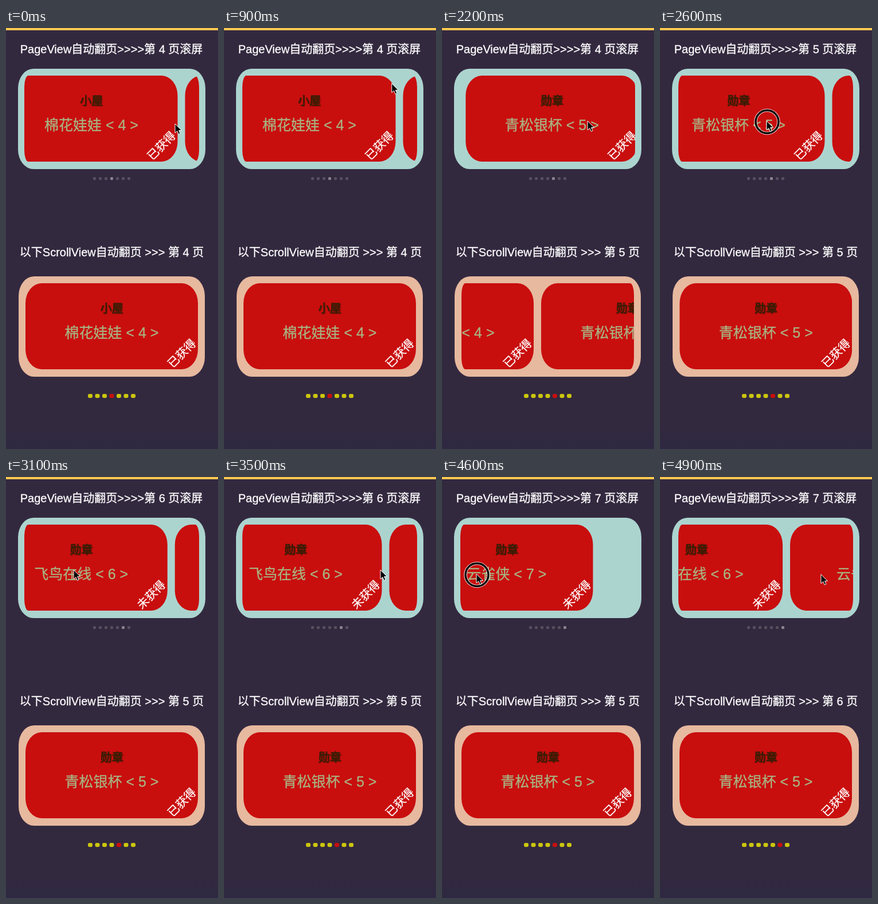
Write an HTML page that moves like this. It is 370x734 px and loops after 5000 ms.

```html
<!DOCTYPE html>
<html lang="zh-CN">
<head>
<meta charset="utf-8">
<style>
  html, body { margin: 0; width: 100%; height: 100%; overflow: hidden; background: #33293f; }
  svg { display: block; width: 100%; height: 100%; }
  text {
    font: 20px "Liberation Sans", "Noto Sans CJK SC", "Noto Sans CJK", sans-serif;
    fill: #fff; stroke: #fff; stroke-width: .3; text-anchor: middle;
  }
  .kind { fill: #2a2206; stroke: #2a2206; text-shadow: 1px 1px 1px #5a1506; }
  .name { font-size: 25px; fill: #a9b483; stroke: #a9b483; }
</style>
</head>
<body>
<svg viewBox="0 0 370 734">
  <defs>
    <linearGradient id="bg" x2="0" y2="1">
      <stop offset=".94" stop-color="#33293f"/>
      <stop offset="1" stop-color="#2e2842"/>
    </linearGradient>
    <clipPath id="topClip"><rect x="32" y="83" width="305" height="150" rx="7" ry="20"/></clipPath>
    <clipPath id="lowClip"><rect x="34" y="445" width="301" height="150" rx="7" ry="20"/></clipPath>
  </defs>
  <rect width="370" height="734" fill="url(#bg)"/>
  <rect width="370" height="4" fill="#ffc850"/>
  <text id="topTitle" x="184" y="44"></text>
  <text id="lowTitle" x="184.5" y="397.5"></text>
  <rect x="21" y="71" width="327" height="175" rx="27" ry="34" fill="#acd4cf"/>
  <rect x="22" y="433" width="325" height="175" rx="27" ry="34" fill="#e7b99f"/>
  <g clip-path="url(#topClip)"><g id="topStrip"></g></g>
  <g clip-path="url(#lowClip)"><g id="lowStrip"></g></g>
  <g id="topDots"></g>
  <g id="lowDots"></g>
  <g id="cursor">
    <g id="ring" fill="none">
      <circle cx="1" cy="1.5" r="20" stroke="#fff" stroke-opacity=".8" stroke-width="5.5"/>
      <circle cx="1" cy="1.5" r="20" stroke="#000" stroke-width="3.4"/>
    </g>
    <path d="M0 0V16L3.8 12.6L6.3 18.3L9 17.1L6.6 11.6H11.5Z" stroke="#fff"/>
  </g>
</svg>
<script>
const $ = id => document.getElementById(id);
const LOOP = 5000, PITCH = 314, FIRST = 4, TURN = 300;
const AUTO_START = 2100, AUTO_EVERY = 2800, AUTO_TURN = 665;
const cards = [
  ["小屋", "棉花娃娃", "已获得"],
  ["勋章", "青松银杯", "已获得"],
  ["勋章", "飞鸟在线", "未获得"],
  ["勋章", "云雀侠", "未获得"]
];

// swipes over the upper view: press and release times, pointer x at each, page reached
const swipes = [
  { down: 1900, up: 2125, x0: 310, x1: 215, y: 162, to: 5 },
  { down: 2600, up: 2950, x0: 186, x1: 60, y: 162, to: 6 },
  { down: 3850, up: 4240, x0: 294, x1: 98, y: 162, to: 7 },
  { down: 4600, up: 4868, x0: 60, x1: 278, y: 169, to: 6 }
];
// pointer between swipes: time, x, y
const hovers = [[0, 295, 167], [800, 300, 88], [1700, 235, 166], [2200, 254, 162], [3500, 273, 162], [LOOP, 290, 172]];
const path = [
  ...hovers,
  ...swipes.flatMap(s => [[s.down, s.x0, s.y], [s.up, s.x1, s.y]])
].sort((a, b) => a[0] - b[0]);

const strip = cards.map(([kind, name, badge], i) => `<g transform="translate(${i * PITCH})">
  <rect x="-150.5" width="301" height="150" rx="28" ry="35" fill="#c90e0e"/>
  <text class="kind" y="50.5">${kind}</text>
  <text class="name" y="95">${name} &lt; ${i + FIRST} &gt;</text>
  <text transform="translate(122 122) rotate(-45)" y="7.5">${badge}</text></g>`).join("");
$("topStrip").innerHTML = $("lowStrip").innerHTML = strip;

function addDots(id, x, y, w, h, gap, r) {
  for (let i = 0; i < 7; i++)
    $(id).innerHTML += `<rect x="${x + i * gap}" y="${y}" width="${w}" height="${h}" rx="${r}"/>`;
}
addDots("topDots", 152, 260, 5, 5, 10, 1.8);
addDots("lowDots", 143, 638, 8, 7, 12.5, 2.4);

function paintDots(id, page, on, off) {
  [...$(id).children].forEach((d, i) => d.setAttribute("fill", i === page - 1 ? on : off));
}

const easeOut = u => 1 - (1 - Math.min(1, Math.max(0, u))) ** 5;

function pointerAt(t) {
  const i = Math.max(1, path.findIndex(p => p[0] >= t));
  const [t0, x0, y0] = path[i - 1], [t1, x1, y1] = path[i];
  const u = (t - t0) / (t1 - t0);
  return [x0 + (x1 - x0) * u, y0 + (y1 - y0) * u];
}

// each resting page sits 12px further left than the one before
const rest = page => 149 - (PITCH + 12) * (page - FIRST);

function upperAt(t) {
  const state = { x: rest(FIRST), title: FIRST, dot: FIRST, pressed: false };
  let from = FIRST;
  for (const { down, up, x0, to } of swipes) {
    if (t < down) break;
    state.pressed = t < up;
    state.x = rest(from) + pointerAt(Math.min(t, up))[0] - x0;
    if (t >= up) {
      state.x += (rest(to) - state.x) * easeOut((t - up) / TURN);
      if (to > from) state.dot = to;
      if (t >= up + TURN / 2) state.title = to;
    }
    from = to;
  }
  return state;
}

function move(id, x, y) {
  $(id).setAttribute("transform", `translate(${x} ${y})`);
}

function draw(now) {
  const t = now % LOOP;
  const up = upperAt(t);
  move("topStrip", up.x, 83);
  $("topTitle").textContent = `PageView自动翻页>>>>第 ${up.title} 页滚屏`;
  paintDots("topDots", up.dot, "#8a8690", "#57505f");

  const turns = Math.max(0, Math.floor((t - AUTO_START) / AUTO_EVERY) + 1);
  const since = t - AUTO_START - (turns - 1) * AUTO_EVERY;
  const shown = turns && turns - 1 + easeOut(since / AUTO_TURN);
  const page = FIRST + turns;
  move("lowStrip", 184.5 - PITCH * shown, 445);
  $("lowTitle").textContent = `以下ScrollView自动翻页 >>> 第 ${page} 页`;
  paintDots("lowDots", page, "#c90e0e", "#cbc60e");

  move("cursor", ...pointerAt(t));
  $("ring").style.display = up.pressed ? "" : "none";
}

let began;
function tick(now) {
  began ??= now;
  draw(now - began);
  requestAnimationFrame(tick);
}
draw(0);
requestAnimationFrame(tick);
</script>
</body>
</html>
```
